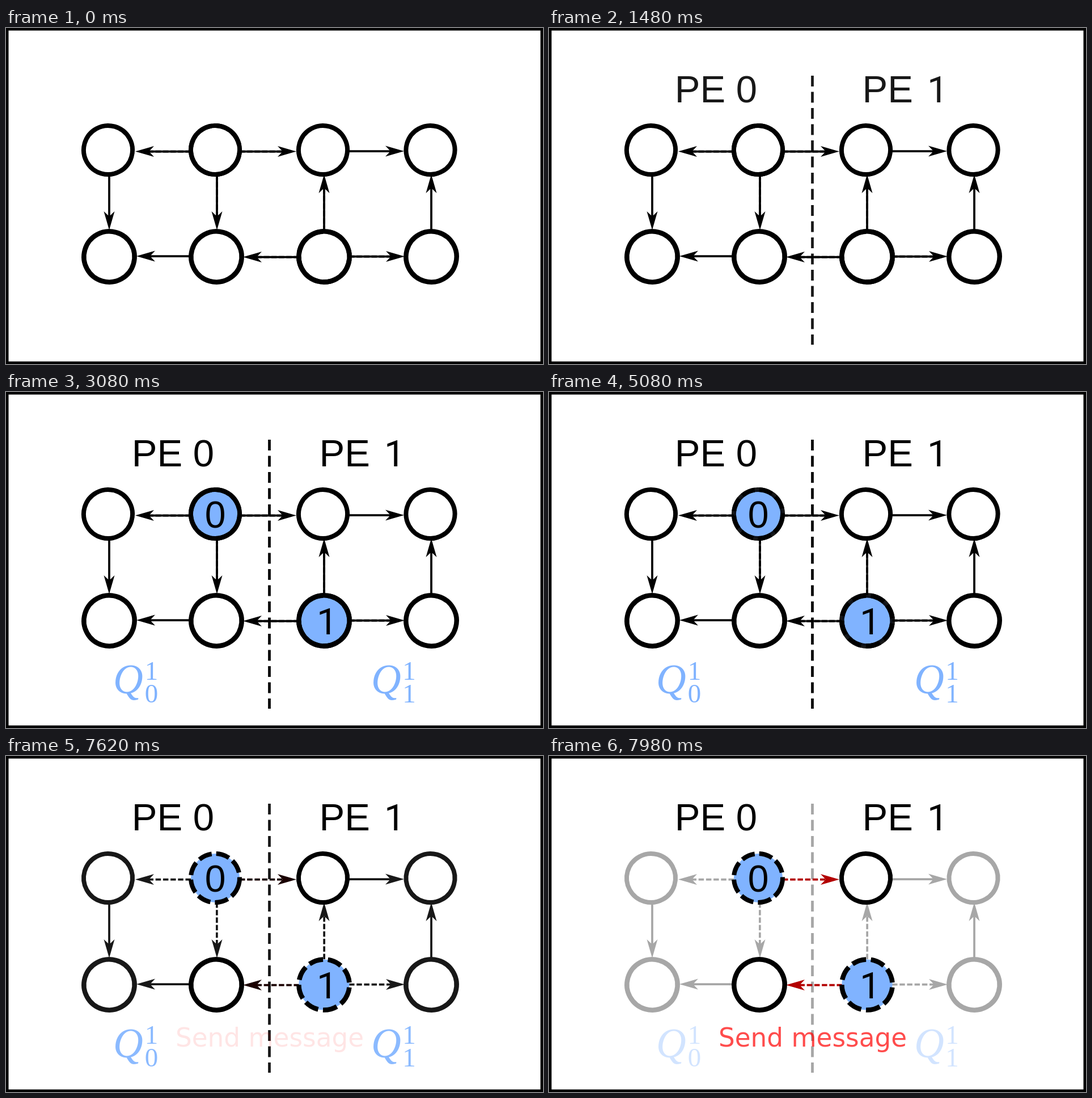
An HTML page that plays this animation: 947x592 px, repeating every 8 s.

```html
<!DOCTYPE html>
<html lang="en">
<head>
<meta charset="utf-8">
<title>Graph search on two processing elements</title>
<style>
  html, body { margin: 0; width: 100%; height: 100%; overflow: hidden; background: #fff; }
  svg { display: block; width: 100vw; height: 100vh; }
  .label { font-family: "Liberation Sans", Arial, sans-serif; font-size: 67px; }
  .one { font-family: Roboto, sans-serif; font-size: 65px; }
  .zero { font-family: "Liberation Sans", Arial, sans-serif; font-size: 66px; }
  .queue { fill: #80b3ff; font-family: "Liberation Serif", "Times New Roman", serif; }
  .q { font-size: 73px; font-style: italic; }
  .idx { font-size: 47px; text-anchor: middle; }
  .note { font-family: "DejaVu Sans", Verdana, sans-serif; font-size: 45.3px; fill: #f00; }
</style>
</head>
<body>
<svg id="stage" viewBox="0 0 947 592">
  <rect width="947" height="592" fill="#000"/>
  <rect x="4.5" y="4.5" width="938" height="583" fill="#fff"/>
  <g id="rest"></g>
  <g id="queues" class="queue">
    <text class="q" x="189" y="531">Q</text>
    <text class="idx" x="256.5" y="507">1</text>
    <text class="idx" x="256.5" y="547">0</text>
    <text class="q" x="644" y="531">Q</text>
    <text class="idx" x="711" y="507">1</text>
    <text class="idx" x="711" y="547">1</text>
  </g>
  <g id="split">
    <path d="M464.5 84V558" stroke="#000" stroke-width="4.75" stroke-dasharray="19 9.5"/>
  </g>
  <g id="titles">
    <text class="label" x="221.7" y="131">PE 0</text>
    <text class="label" x="552.6" y="131">PE</text>
    <text class="one" x="667" y="131">1</text>
  </g>
  <g id="cross"></g>
  <g id="start">
    <circle cx="369" cy="215" r="43" fill="#80b3ff"/>
    <circle cx="561" cy="403" r="44.6" fill="#80b3ff"/>
    <text class="zero" x="369" y="239" text-anchor="middle">0</text>
    <text class="one" x="548" y="427">1</text>
  </g>
  <g id="active"></g>
  <text id="note" class="note" x="299" y="512">Send message</text>
</svg>
<script>
const $ = id => document.getElementById(id);
const rest = $('rest'), cross = $('cross'), active = $('active');
const solids = [];

function add(parent, tag, attrs) {
  const el = document.createElementNS('http://www.w3.org/2000/svg', tag);
  for (const k in attrs) el.setAttribute(k, attrs[k]);
  return parent.appendChild(el);
}

// Stroked shape; a dashed one carries a solid copy that fades away.
function stroke(parent, tag, attrs, dash) {
  const base = { fill: 'none', ...attrs };
  if (dash) {
    add(parent, tag, { ...base, 'stroke-dasharray': dash });
    solids.push(add(parent, tag, base));
  } else add(parent, tag, base);
}

// Arrow of length len, drawn along +x and turned into place.
function arrow(parent, x, y, angle, len, dashed) {
  const g = add(parent, 'g', { transform: `translate(${x} ${y}) rotate(${angle})`, stroke: parent === cross ? 'inherit' : '#000' });
  stroke(g, 'path', { d: `M0 0H${len - 20}`, 'stroke-width': 3.75 }, dashed && '9.5 3.7');
  add(g, 'path', {
    d: `M${len} 0l-33 9.5l9 -9.5l-9 -9.5z`,
    stroke: 'none', fill: parent === cross ? 'inherit' : '#000'
  });
}

function ring(parent, x, y, dashed) {
  const top = y < 300, w = top ? 8 : 8.5;
  stroke(parent, 'circle', {
    cx: x, cy: y, r: top ? 43 : 44.6, stroke: '#000', 'stroke-width': w,
    transform: `rotate(16 ${x} ${y})`
  }, dashed && `${3 * w} ${w}`);
}

const R = 0, D = 90, L = 180, U = -90;
[
  [rest, 326, 217.5, L, 98, true],
  [rest, 372, 258, D, 98, true],
  [rest, 561, 358, U, 100, true],
  [rest, 605, 402.5, R, 98, true],
  [rest, 602, 217, R, 100],
  [rest, 182, 258, D, 98],
  [rest, 326, 402, L, 96],
  [rest, 750, 358, U, 100],
  [cross, 412, 217.5, R, 100, true],
  [cross, 517, 403.5, L, 99, true]
].forEach(a => arrow(...a));

[
  [rest, 180, 215], [rest, 748.5, 215],
  [rest, 182, 403], [rest, 750, 403],
  [active, 559, 215], [active, 371, 403],
  [active, 369, 215, true], [active, 561, 403, true]
].forEach(a => ring(...a));

const LOOP = 8000, STEP = 60;

// Ten equal fade steps; the first shows at once.
const fade = (t, from) =>
  Math.max(0, Math.min(10, Math.floor((t - from) / STEP) + 1)) / 10;

function draw(t) {
  const split = fade(t, 1000), visit = fade(t, 2540);
  const dash = fade(t, 5080), send = fade(t, 7620);
  const dim = 1 - 0.93 * send;
  const red = `rgb(${Math.round(255 * send)},0,0)`;

  $('titles').style.opacity = split;
  $('split').style.opacity = split * dim;
  $('start').style.opacity = visit;
  $('queues').style.opacity = visit * dim;
  solids.forEach(s => { s.style.opacity = 1 - dash; });
  rest.style.opacity = dim;
  cross.style.stroke = cross.style.fill = red;
  $('note').style.opacity = send;
}

const t0 = performance.now();
function tick() {
  draw((performance.now() - t0) % LOOP);
  requestAnimationFrame(tick);
}
tick();
</script>
</body>
</html>
```
